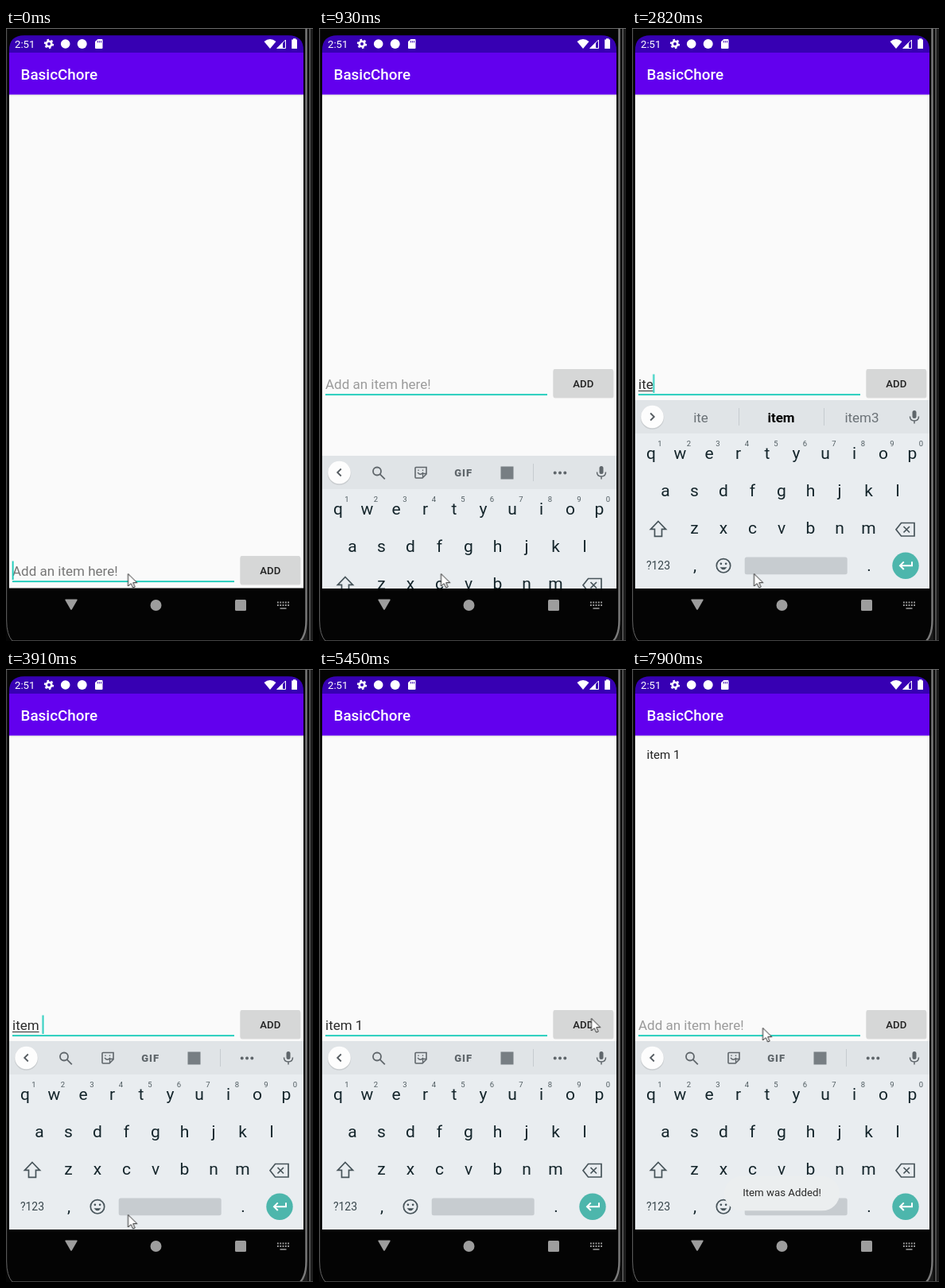
An HTML page that plays this animation: 386 px wide and 771 px high, repeating every 8 s.

```html
<!DOCTYPE html>
<html lang="en">
<head>
<meta charset="utf-8">
<title>Todo list</title>
<style>
html, body { margin: 0; width: 100%; height: 100%; overflow: hidden; background: #000; }
svg { font-family: Roboto, sans-serif; }
#stage { display: block; width: 100vw; height: 100vh; }

.anim { animation: 8s step-end infinite; }
#row { animation-name: row; }
#hint { animation-name: hint; }
#typed { animation-name: typed; }
#caret { animation-name: caret; }
#press { animation-name: press; }
#lift { animation-name: lift; }
#board { animation-name: board; }
#strip { animation-name: strip; }
#item { animation-name: item; }
#toast { animation-name: toast; }
#mouse { animation-name: mouse; }

@keyframes row {
  0% { transform: translateY(235px); }
  10.125% { transform: none; }
}
@keyframes hint {
  0% { fill: #767676; }
  1.75% { fill: #9b9b9b; }
}
/* each step scrolls the reel to the next typed text */
@keyframes typed {
  0% { transform: none; }
  21% { transform: translateY(-30px); }
  32.25% { transform: translateY(-60px); }
  35.25% { transform: translateY(-90px); }
  43.875% { transform: translateY(-120px); }
  50.375% { transform: translateY(-150px); }
  82.875% { transform: none; }
}
@keyframes caret {
  0% { opacity: 1; transform: none; }
  10.125% { opacity: 0; }
  13.125% { opacity: 1; }
  21% { opacity: 0; transform: translateX(4px); }
  27.625% { opacity: 1; }
  32.25% { transform: translateX(9.6px); }
  35.25% { transform: translateX(18.6px); }
  40.625% { opacity: 0; }
  43.875% { opacity: 1; transform: translateX(33.6px); }
  48.875% { transform: translateX(37.8px); }
  50.375% { transform: translateX(46.7px); }
  57.125% { opacity: 0; }
  62% { opacity: 1; }
  68.125% { opacity: 0; }
  74.75% { opacity: 1; }
  82.875% { transform: none; }
  89.125% { opacity: 0; }
  92.5% { opacity: 1; }
  98.75% { opacity: 0; }
}
@keyframes press {
  0% { fill: #d6d7d7; }
  79.75% { fill: #b9baba; }
  86.125% { fill: #c8c9c9; }
  87.625% { fill: #d6d7d7; }
}
@keyframes lift {
  0% { opacity: 0; }
  79.75% { opacity: 1; }
  86.125% { opacity: .5; }
  87.625% { opacity: 0; }
}
@keyframes board {
  0% { transform: translateY(240px); }
  11.625% { transform: translateY(70px); }
  13.125% { transform: none; }
}
@keyframes strip {
  0% { transform: none; }
  21% { transform: translateY(-42px); }
  33.75% { transform: translateY(-84px); }
  35.25% { transform: translateY(-126px); }
  43.875% { transform: translateY(-168px); }
  48.875% { transform: none; }
}
@keyframes item {
  0% { opacity: 0; }
  84.625% { opacity: 1; }
}
@keyframes toast {
  0% { opacity: 0; }
  86.125% { opacity: .35; }
  87.625% { opacity: .7; }
  89.125% { opacity: .93; }
  91% { opacity: 1; }
}
@keyframes mouse {
  0% { transform: translate(153.5px, 686px); }
  59% { transform: translate(168.5px, 668px); }
  60.5% { transform: translate(217.5px, 611px); }
  62% { transform: translate(277.5px, 530px); }
  63.5% { transform: translate(325.5px, 463px); }
  65% { transform: translate(342.5px, 439px); }
  86.125% { transform: translate(318.5px, 441px); }
  87.625% { transform: translate(276.5px, 444px); }
  89.125% { transform: translate(237.5px, 447px); }
  91% { transform: translate(190.5px, 450px); }
  92.5% { transform: translate(164.5px, 451px); }
}
</style>
</head>
<body>
<svg id="stage" viewBox="0 0 386 771">
  <defs>
    <linearGradient id="shade" x2="0" y2="1">
      <stop stop-color="#000" stop-opacity=".12"/>
      <stop offset="1" stop-color="#000" stop-opacity="0"/>
    </linearGradient>
  </defs>

  <!-- phone body -->
  <rect width="386" height="771" fill="#040404"/>
  <path d="M379 0h7v771h-15q8-8 8-26z" fill="#1c1c1c"/>
  <g fill="none">
    <path d="M0 .5H386" stroke="#6a6a6a"/>
    <path d="M.7 1V745Q.7 763 8 771" stroke="#666"/>
    <path d="M377.500 1V745Q377.500 763 370 771" stroke="#7c7c7c" stroke-width="2.400"/>
    <path d="M380 1V771" stroke="#0a0a0a" stroke-width="2"/>
    <path d="M382 1V771" stroke="#5c5c5c" stroke-width="1.600"/>
    <path d="M8 770.500H386" stroke="#444"/>
  </g>

  <!-- app -->
  <rect x="4" y="83" width="370" height="621.500" fill="#fafafa"/>
  <rect x="4" y="83.700" width="370" height="2.500" fill="url(#shade)"/>
  <path d="M4 32V28Q4 9.300 23 9.300H355Q374 9.300 374 28V32Z" fill="#3700b3"/>
  <rect x="4" y="31" width="370" height="52.700" fill="#6200ee"/>
  <text x="18.500" y="65" font-size="18.840" font-weight="500" fill="#fff">BasicChore</text>

  <!-- status bar -->
  <g fill="#fff">
    <text x="11" y="25" font-size="13.200">2:51</text>
    <g fill="none" stroke="#fff">
      <circle cx="54" cy="20" r="3.300" stroke-width="2.600"/>
      <circle cx="54" cy="20" r="5.200" stroke-width="1.900" pathLength="12" stroke-dasharray="1 1"/>
    </g>
    <circle cx="74.700" cy="20" r="5.800"/>
    <circle cx="95.700" cy="20" r="6"/>
    <path d="M115.500 14h5q1 0 1 1v10q0 1-1 1h-7.500q-1 0-1-1v-8z"/>
    <path d="M115.500 16v2.500m2-2.500v2.500m2-2.500v2.500" stroke="#3700b3" stroke-width=".9"/>
    <path d="M324.500 17q7.500-6 15 0l-7.500 9z"/>
    <path d="M351.500 15v10.500h-10.500z" fill="none" stroke="#fff"/>
    <path d="M348 18v8h-8z"/>
    <path d="M361 13.200h3.500v1.300h1.500v11.500h-6.800v-11.500h1.800z"/>
  </g>

  <text id="item" class="anim" x="18.500" y="112.500" font-size="15.070" fill="#222">item 1</text>

  <!-- input row -->
  <g id="row" class="anim">
    <svg x="4" y="433" width="286" height="27">
      <g id="typed" class="anim" font-size="17" fill="#2b2b2b">
        <text id="hint" class="anim" x="4" y="21">Add an item here!</text>
      </g>
    </svg>
    <rect x="8" y="460.200" width="279" height="1.900" fill="#1fccbb"/>
    <rect id="caret" class="anim" x="7.700" y="435.500" width="1.900" height="23.500" fill="#1fccbb"/>
    <rect x="294.500" y="430" width="76" height="35.500" rx="2.500" fill="#000" opacity=".13"/>
    <g id="lift" class="anim" fill="#000" fill-opacity=".07">
      <rect x="294" y="430" width="77" height="36" rx="3"/>
      <rect x="293.500" y="430" width="78" height="37.500" rx="4"/>
    </g>
    <rect id="press" class="anim" x="294.500" y="429" width="75.500" height="35.300" rx="2"/>
    <text x="332.300" y="451.500" font-size="13.200" font-weight="500" text-anchor="middle" fill="#222">ADD</text>
  </g>

  <!-- keyboard -->
  <svg y="468" width="374" height="236.500" viewBox="0 468 374 236.500">
    <g id="board" class="anim">
      <rect x="4" y="468" width="370" height="42" fill="#e0e4e7"/>
      <rect x="4" y="510" width="370" height="195" fill="#e9edf0"/>
      <svg y="468" width="340" height="42">
        <g id="strip" class="anim">
          <g fill="none" stroke="#5f666b" stroke-width="1.800">
            <circle cx="73" cy="19.500" r="5"/>
            <path d="M76.800 23.300l6 6"/>
            <path d="M122 14.500h13v8.500l-5 5h-8q-1 0-1-1v-11.500q0-1 1-1z" stroke-width="1.600"/>
            <path d="M135 22.500h-4.500v5M124 21q3.500 4.500 7 0M125 17.500v1.500M130.500 17.500v1.500" stroke-width="1.300"/>
            <text x="181.700" y="26" font-size="13" font-weight="900" letter-spacing="1" text-anchor="middle" fill="#5f666b" stroke="none">GIF</text>
            <rect x="228.500" y="13.500" width="16" height="16" fill="#777e83" stroke="none"/>
            <path d="M269.500 10v22" stroke="#c6cbcf" stroke-width="1"/>
            <path d="M296.700 21.500h.01m6.300 0h.01m6.300 0h.01" stroke-width="4" stroke-linecap="round"/>
          </g>
        </g>
      </svg>
      <g fill="none" stroke="#5f666b" stroke-width="1.700">
        <rect x="352.500" y="481" width="5" height="10" rx="2.500" fill="#5f666b" stroke="none"/>
        <path d="M349.500 488.500q0 5.500 5.500 5.500t5.500-5.500M355 494v3.500" stroke-width="1.500"/>
      </g>
      <g id="keys" font-size="21" text-anchor="middle" fill="#14252b"></g>
      <g fill="none" stroke="#47545a" stroke-width="1.700">
        <path d="M33 620.500l9.500 9.800h-5v9h-9v-9h-5z"/>
        <path d="M338.500 622.500h16.500v16.500h-16.500l-6.500-8.250zM341.500 627l7.500 7.500m0-7.500l-7.500 7.500"/>
        <circle cx="115" cy="676.300" r="8.700"/>
        <path d="M110.500 678.300q4.500 6 9 0z" fill="#47545a" stroke="none"/>
        <path d="M111.900 673.800h.01m6.200 0h.01" stroke-width="2.700" stroke-linecap="round"/>
      </g>
      <rect x="141.700" y="665.500" width="129" height="21.700" rx="2.500" fill="#c7ccd0"/>
      <circle cx="344" cy="676.200" r="16.700" fill="#4db6ac"/>
      <path d="M352 671.200v5h-15m4.800-4.800l-4.800 4.800 4.800 4.800" fill="none" stroke="#fff" stroke-width="2"/>
    </g>
  </svg>

  <g id="toast" class="anim">
    <rect x="116" y="638" width="145" height="43.300" rx="21.650" fill="#ebeeef"/>
    <text x="188.500" y="663.300" font-size="13.260" text-anchor="middle" fill="#2a2a2a">Item was Added!</text>
  </g>

  <!-- navigation -->
  <g fill="#9d9d9d">
    <path d="M75 718.500h14q1.300 0 .5 1.200l-6.600 11.500q-.9 1.200-1.800 0l-6.600-11.500q-.8-1.200.5-1.200z"/>
    <circle cx="188.500" cy="726" r="7"/>
    <rect x="288" y="719" width="14" height="14" rx="1.500"/>
    <path d="M341 722.500h15M341 726h15" fill="none" stroke="#9d9d9d" stroke-width="1.800" stroke-dasharray="1.800 1.500"/>
    <path d="M344.500 730h8" stroke="#9d9d9d" stroke-width="1.500"/>
  </g>

  <path id="mouse" class="anim" d="M0 .5V16L3.700 12.700 6.200 18 8.600 17 6.300 11.700H11.300Z" fill="#fff" stroke="#111" stroke-width=".9"/>
</svg>

<script>
const $ = id => document.getElementById(id);
const add = (id, markup) => $(id).insertAdjacentHTML('beforeend', markup);
const text = (x, y, s, attrs = '') => `<text x="${x}" y="${y}" ${attrs}>${s}</text>`;

// typed texts; all but the last are underlined while composing
[['i', 4], ['it', 9.6], ['ite', 18.6], ['item', 33.6], ['item 1', 0]].forEach(([s, w], i) => {
  const y = 21 + 30 * (i + 1);
  add('typed', text(4, y, s) + `<rect x="4" y="${y + 2}" width="${w}" height="1"/>`);
});

// suggestion strip
const chevron = (y, dir) =>
  `<circle cx="25.500" cy="${y + 1}" r="14.800" fill="#000" opacity=".1"/>
   <circle cx="25.500" cy="${y}" r="14.300" fill="#fdfdfd"/>
   <path d="M${25.5 - 2.3 * dir} ${y - 4.5}l${4.6 * dir} 4.500l${-4.6 * dir} 4.500" fill="none" stroke="#555c61" stroke-width="1.800"/>`;
add('strip', chevron(21, -1));
[['i', 'I', "I'm"], ['it\u2019s', 'it', 'its'], ['ite', 'item', 'item3'], ['item', 'items', 'item3']].forEach((words, i) => {
  const y = 42 * (i + 1);
  const parts = words.map((w, n) => text([86.5, 187.5, 289][n], y + 28, w,
    n === 1 ? 'font-weight="700" fill="#000"' : 'fill="#6a7176"'));
  add('strip', chevron(y + 21, 1) +
    `<g font-size="17" text-anchor="middle">${parts.join('')}</g>
     <path d="M134.500 ${y + 10}v22M241.500 ${y + 10}v22" stroke="#c6cbcf"/>`);
});

// letter keys
const pitch = 36.5;
[['qwertyuiop', 24, 541.7], ['asdfghjkl', 42, 588.7], ['zxcvbnm', 78.5, 636.3]].forEach(([row, x0, y]) =>
  [...row].forEach((c, i) => add('keys', text(x0 + pitch * i, y, c))));
[...'1234567890'].forEach((c, i) =>
  add('keys', text(35 + pitch * i, 526.3, c, 'font-size="9.500" fill="#4f5b60"')));
add('keys', text(33, 681.3, '?123', 'font-size="14" fill="#38464c"') + text(79, 683, ',') + text(298, 683, '.'));
</script>
</body>
</html>
```
